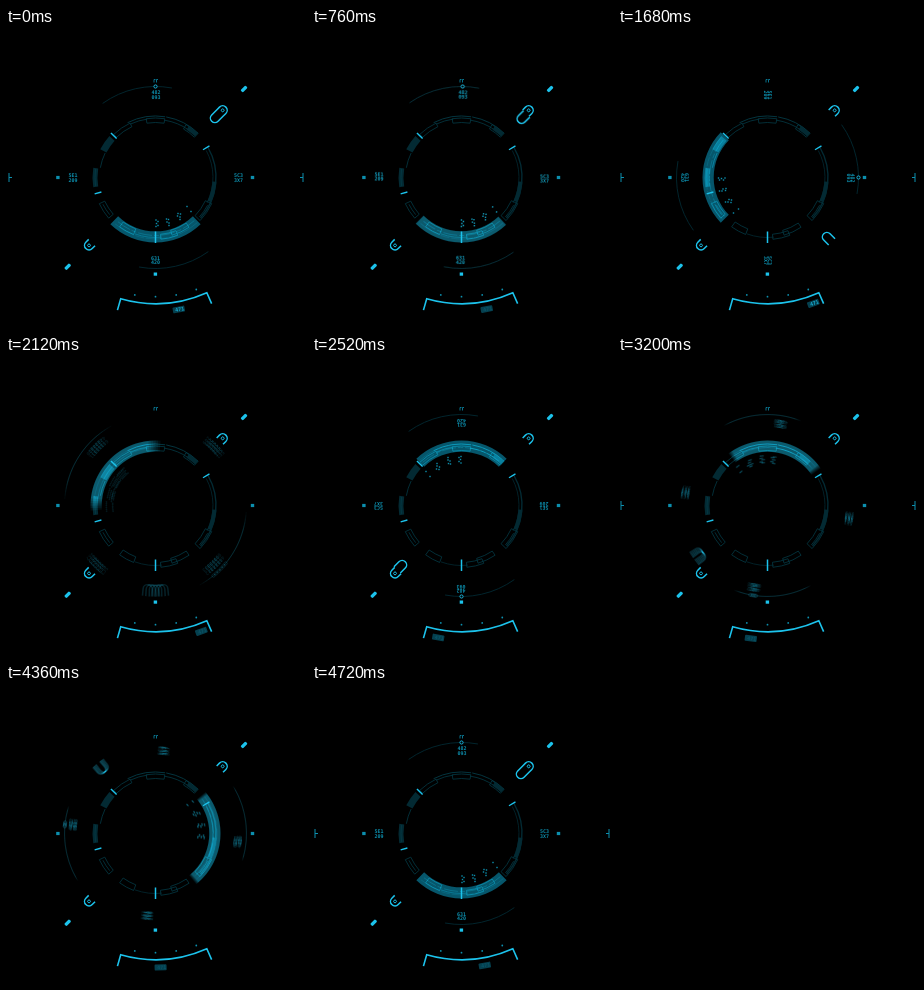
Write an HTML page that moves like this. It is 300x300 px and loops after 4760 ms.

```html
<!DOCTYPE html>
<html lang="en">
<head>
<meta charset="utf-8">
<title>HUD dial</title>
<style>
  html, body { margin: 0; width: 100%; height: 100%; overflow: hidden; background: #000; }
  svg { display: block; width: 100vw; height: 100vh; }
  text { font: bold 5px "DejaVu Sans Mono", monospace; text-anchor: middle; }
  use { mix-blend-mode: plus-lighter; }
</style>
</head>
<body>
<svg viewBox="0 0 300 300">
  <defs><g id="dial" fill="none"></g></defs>
  <g transform="translate(149.5 149.5)" fill="none">
    <g id="fixed"></g>
    <g id="blur"></g>
    <g id="over"></g>
    <g id="tag"></g>
    <g id="edges"></g>
  </g>
</svg>
<script>
const LOOP = 4760, STEP = 1180, MOVE_AT = 700, TAG_AT = 600, FRAME = 40;
const SHUTTER = 20, SAMPLES = 6;
const BRIGHT = '#1cc3ec', MID = '#0c8fae', DIM = '#053a46', FAINT = '#032a33';
const [fixed, dial, blur, over, tag, edges] =
  ['fixed', 'dial', 'blur', 'over', 'tag', 'edges'].map(id => document.getElementById(id));

function add(parent, name, attrs) {
  const el = document.createElementNS('http://www.w3.org/2000/svg', name);
  for (const key in attrs) el.setAttribute(key, attrs[key]);
  parent.appendChild(el);
  return el;
}

function polar(r, deg) {
  const a = deg * Math.PI / 180;
  return [r * Math.cos(a), r * Math.sin(a)].map(v => v.toFixed(2)).join(' ');
}

const arcPath = (r, a, b) => `M${polar(r, a)}A${r} ${r} 0 0 1 ${polar(r, b)}`;
const sector = (r1, r2, a, b) =>
  `M${polar(r1, a)}A${r1} ${r1} 0 0 1 ${polar(r1, b)}L${polar(r2, b)}A${r2} ${r2} 0 0 0 ${polar(r2, a)}Z`;
const line = (parent, d, stroke, width, more) =>
  add(parent, 'path', { d, stroke, 'stroke-width': width, ...more });
const arc = (parent, r, a, b, stroke, width, more) =>
  line(parent, arcPath(r, a, b), stroke, width, more);
const spoke = (parent, r1, r2, a, width) =>
  line(parent, `M${polar(r1, a)}L${polar(r2, a)}`, BRIGHT, width);
const box = (parent, x, y, w, h, fill, more) =>
  add(parent, 'rect', { x, y, width: w, height: h, fill, ...more });

// inner ring: thin arcs, outlined boxes and solid blocks
arc(fixed, 56, 190, 206, DIM, 0.8);
arc(fixed, 61.5, 243, 279, DIM, 0.9);
arc(fixed, 59, 245, 262, DIM, 0.8);
arc(fixed, 61.5, 280, 314, DIM, 0.9);
arc(fixed, 58, 279, 305, DIM, 0.8);
arc(fixed, 60.5, -30, 42, FAINT, 1.4);
arc(fixed, 57.5, -28, 26, FAINT, 0.8);
arc(fixed, 60, 84, 110, FAINT, 0.8);
[[55, 59.5, 261, 279], [56, 60, 226, 245], [55, 62, 25, 44], [56, 62, 139, 155],
 [55, 61, 111, 126], [57, 62, 69, 85], [55, 60, 56, 74], [56, 61, 300, 314]]
  .forEach(([r1, r2, a, b]) => line(fixed, sector(r1, r2, a, b), DIM, 0.8));
[[58, 63, 171, 189], [55, 62, 207, 222], [57, 61, 303, 314], [57, 61, 4, 24]]
  .forEach(([r1, r2, a, b]) => add(fixed, 'path', { d: sector(r1, r2, a, b), fill: FAINT }));
arc(fixed, 59, 28, 42, DIM, 0.8);
arc(fixed, 59, 141, 153, DIM, 0.8);
arc(fixed, 60.5, 172, 188, DIM, 0.8);

// capsule ends and pills on the diagonal
for (const [a, shift] of [[-45, 0], [135, -1]]) {
  const g = add(fixed, 'g', { transform: `rotate(${a}) translate(0 ${shift})` });
  line(g, 'M91 -4.5H95A4.5 4.5 0 0 1 95 4.5H91', BRIGHT, 1.5);
  add(g, 'circle', { cx: 95, cy: 0, r: 1.4, stroke: BRIGHT, 'stroke-width': 0.9 });
  box(g, 121.7, -1.7, 7, 3.4, BRIGHT, { rx: 1.2 });
}

// markers on the axes
box(fixed, -99.3, -1.6, 3.4, 3.2, MID);
box(fixed, 95.3, -1.6, 3.4, 3.2, MID);
box(fixed, -1.8, 95, 3.4, 3.2, BRIGHT);
line(fixed, 'M-1.5 -95V-98H0M1 -95V-98H2.5', MID, 0.8);

// bottom gauge
line(fixed, `M${polar(138, 106)}L${polar(126.2, 106)}A126.2 126.2 0 0 0 ${polar(126.2, 66)}L${polar(138, 66)}`,
  BRIGHT, 1.6);
for (const a of [70, 80, 90, 100]) {
  const [cx, cy] = polar(119.2, a).split(' ');
  add(fixed, 'circle', { cx, cy, r: 0.9, fill: MID });
}

// turning band
add(dial, 'path', { d: sector(53.8, 65, 46, 134), fill: '#06566b' });
arc(dial, 61.5, 47, 133, '#08667d', 1, { 'stroke-dasharray': '22 1.5 9 1.5' });
arc(dial, 58, 48, 132, '#0a728b', 1, { 'stroke-dasharray': '14 2 5 2' });

// outer arcs with their ring
arc(dial, 91, 234.5, 280.4, FAINT, 0.9);
arc(dial, 91, 54.5, 100.4, FAINT, 0.9);
add(dial, 'circle', { cx: 0, cy: -91, r: 1.6, fill: '#000', stroke: BRIGHT, 'stroke-width': 0.9 });

// dotted marks inside the band
const marks = [
  [0.5, 45.5, [[0, -3], [2, -1.5], [0.5, 0.5], [2, 2.5], [0, 3.5]]],
  [12, 44.5, [[-1, -3], [1, -2.5], [-0.5, 0], [1.5, 1], [1.5, 3.5]]],
  [23.5, 38.5, [[-1, -2.5], [1.5, -2], [-1.5, 0], [1, 1], [1, 3.5]]],
  [33, 31.5, [[-1.5, -2.5], [2.5, 2.5]]]
];
for (const [x, y, dots] of marks)
  for (const [dx, dy] of dots) box(dial, x + dx - 0.7, y + dy - 0.7, 1.4, 1.4, MID);

// turning labels
const labels = [[0.5, -83, '482', '093'], [83, 0, '5C3', '3X7'], [0, 82.5, '631', '420'], [-82.5, 0, '5E1', '209']];
for (const [x, y, ...rows] of labels)
  rows.forEach((row, i) => {
    add(dial, 'text', { x, y: y - 0.4 + i * 4.4, fill: MID }).textContent = row;
  });

// turning half of the capsule
const cup = add(dial, 'g', { transform: 'rotate(-45)' });
line(cup, 'M91 -4.5H84A4.5 4.5 0 0 0 84 4.5H91', BRIGHT, 1.5);

// bright ticks
spoke(over, 54, 65.5, 90, 1.5);
spoke(over, 55, 63, 225, 1.4);
spoke(over, 55, 62.5, -30.3, 1.4);
spoke(over, 56, 63, 165, 1.4);

// gauge tag
box(tag, -6, -3, 12, 6, '#05404f', { rx: 1 });
const tagText = add(tag, 'text', { x: 1, y: 1.8, fill: BRIGHT });
tagText.textContent = '471';

// blinking edge marks
line(edges, 'M-146.5 -4.5V4.5M-146.5 0H-143.5M147.5 -4.5V4.5M147.5 0H144.5', MID, 1);

// copies of the dial that add up to its motion blur
const copies = Array.from({ length: SAMPLES }, () => add(blur, 'use', { href: '#dial' }));

const clamp = v => Math.min(1, Math.max(0, v));
const ease = p => p < 0.5 ? 4 * p ** 3 : 1 - 4 * (1 - p) ** 3;
const progress = (phase, from) => ease(clamp((phase - from) / (STEP - from)));
const stops = [80, 70, 100, 90, 80];

function dialAngle(t) {
  const step = Math.floor(t / STEP);
  return 90 * (step + progress(t - step * STEP, MOVE_AT));
}

function draw(time) {
  const frame = Math.floor((time % LOOP) / FRAME);
  const t = frame * FRAME;
  const step = Math.floor(t / STEP), phase = t - step * STEP;

  const moving = phase > MOVE_AT;
  copies.forEach((copy, i) => {
    const lag = moving ? SHUTTER * (i / (SAMPLES - 1) - 0.5) : 0;
    copy.setAttribute('transform', `rotate(${dialAngle(t + lag)})`);
    copy.setAttribute('opacity', moving ? 1 / SAMPLES : i ? 0 : 1);
  });
  edges.setAttribute('visibility', frame % 2 ? 'hidden' : 'visible');

  // the tag slides back one stop, but jumps from the last to the first
  const from = stops[step], to = stops[step + 1] ?? from;
  const angle = to > from ? (phase < 1090 ? from : to) : from + (to - from) * progress(phase, TAG_AT);
  tag.setAttribute('transform', `rotate(${angle - 90}) translate(0 134)`);
  const rise = step ? clamp((phase - 160) / 160) : 1;
  const fall = clamp((phase - TAG_AT) / 120);
  tagText.setAttribute('opacity', 0.15 + 0.65 * Math.min(rise, 1 - fall));
}

const start = performance.now();
function tick() {
  draw(performance.now() - start);
  requestAnimationFrame(tick);
}
tick();
</script>
</body>
</html>
```
